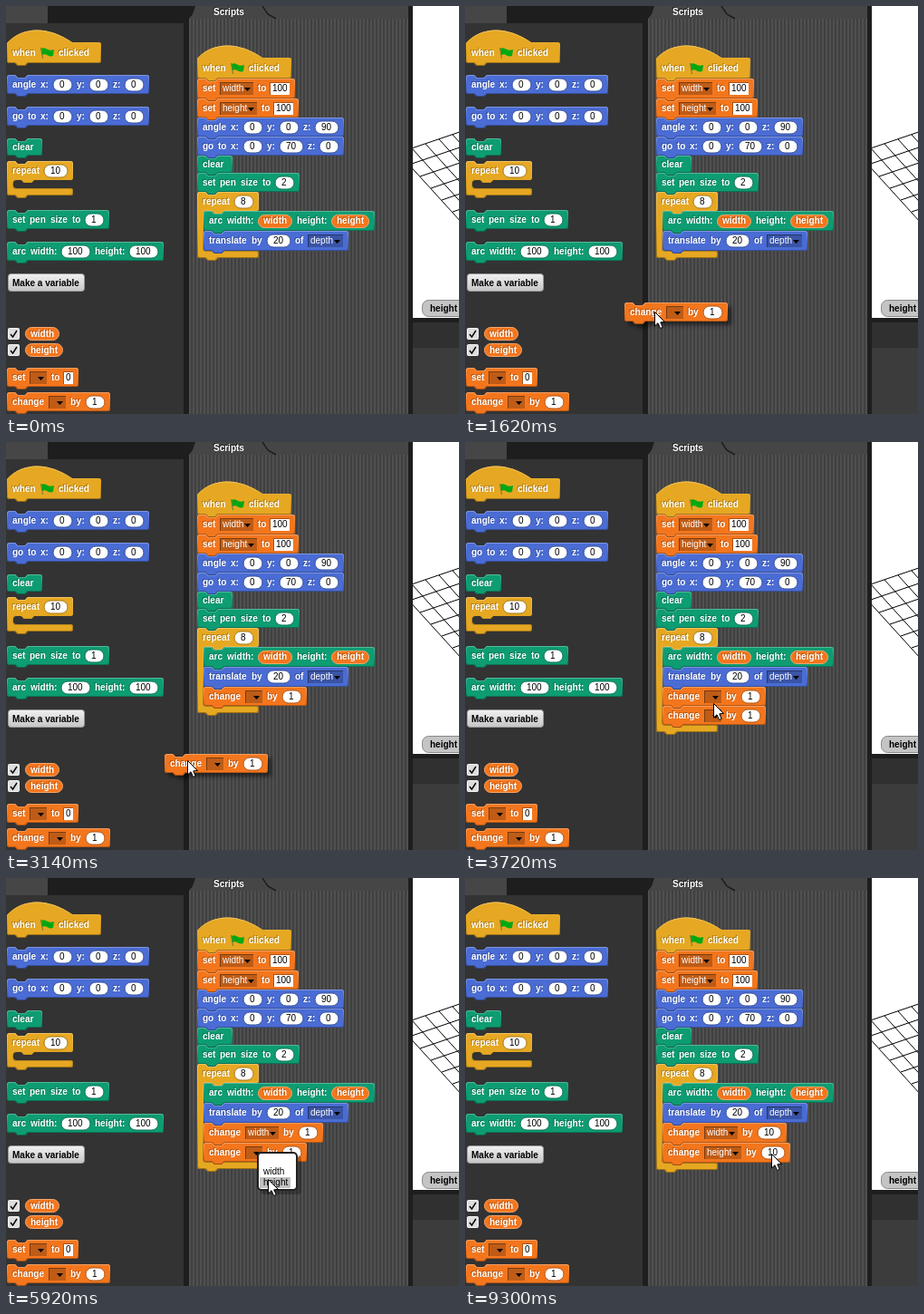
Recreate the animation shown at these times as an HTML page with a canvas. Size 500 by 450 pixels, loop 9540 ms.

```html
<!DOCTYPE html>
<html lang="en">
<head>
<meta charset="utf-8">
<title>Block script editor</title>
<style>
html, body { margin: 0; width: 100%; height: 100%; overflow: hidden; background: #1e1e1e; }
canvas { display: block; }
</style>
</head>
<body>
<canvas id="stage" width="500" height="450"></canvas>
<script>
const canvas = document.getElementById('stage');
let ctx = canvas.getContext('2d');

const LOOP = 9540, STEP = 40, GAP = 5;
const FONT = '10px "Liberation Sans", Arial, sans-serif';
const BOLD = 'bold ' + FONT;
const YELLOW = [230, 168, 34], BLUE = [74, 108, 212], GREEN = [14, 156, 114], ORANGE = [243, 118, 29];

const rgb = c => `rgb(${c.map(Math.round)})`;
const dark = (c, k) => rgb(c.map(v => v * k));
const light = (c, k) => rgb(c.map(v => v + (255 - v) * k));

function rect(x, y, w, h, fill) {
  ctx.fillStyle = fill;
  ctx.fillRect(x, y, w, h);
}

function round(x, y, w, h, r, fill, line) {
  ctx.beginPath();
  ctx.roundRect(x, y, w, h, r);
  ctx.fillStyle = fill;
  ctx.fill();
  if (line) {
    ctx.strokeStyle = line;
    ctx.lineWidth = 1;
    ctx.stroke();
  }
}

function poly(points, fill) {
  ctx.beginPath();
  points.forEach(([x, y]) => ctx.lineTo(x, y));
  ctx.closePath();
  ctx.fillStyle = fill;
  ctx.fill();
}

function line(points, color, width) {
  ctx.beginPath();
  points.forEach(([x, y]) => ctx.lineTo(x, y));
  ctx.strokeStyle = color;
  ctx.lineWidth = width;
  ctx.stroke();
}

function text(s, x, cy, fill, font = BOLD, shade) {
  const bx = Math.round(x), by = Math.round(cy + 3.4);
  ctx.font = font;
  if (shade) {
    ctx.fillStyle = shade;
    ctx.fillText(s, bx - 1, by - 1);
  }
  ctx.fillStyle = fill;
  ctx.fillText(s, bx, by);
}

function measure(s, font) {
  ctx.font = font;
  return ctx.measureText(s).width;
}

function flag(x, cy) {
  ctx.beginPath();
  ctx.moveTo(x + 1, cy - 5);
  ctx.bezierCurveTo(x + 6, cy - 8, x + 8, cy - 1, x + 15, cy - 4);
  ctx.lineTo(x + 14, cy + 3);
  ctx.bezierCurveTo(x + 8, cy + 5, x + 7, cy - 1, x + 2, cy + 2);
  ctx.closePath();
  ctx.fillStyle = '#00a814';
  ctx.fill();
  line([[x + .5, cy - 6], [x + 2.5, cy + 6]], '#6b7a2a', 1);
}

// Tokens: (n) oval input, [n] box input, <v> drop-down, {v} variable, @ flag, otherwise a word.
function tokenWidth(tok) {
  const s = tok.slice(1, -1);
  switch (tok[0]) {
    case '(': return Math.round(measure(s, FONT) + 15);
    case '[': return Math.round(measure(s, FONT) + 4);
    case '<': return s ? Math.round(measure(s, FONT) + 13.5) : 19;
    case '{': return Math.round(measure(s, BOLD) + 12);
    case '@': return 15;
  }
  return Math.round(measure(tok, BOLD));
}

function variable(s, x, cy, w) {
  round(x + .5, Math.floor(cy) - 6.5, w - 1, 14, 7, rgb(ORANGE), light(ORANGE, .35));
  text(s, x + 6, cy, '#fff', BOLD, dark(ORANGE, .75));
}

function drawToken(tok, x, cy, w, color) {
  const s = tok.slice(1, -1);
  switch (tok[0]) {
    case '(':
      round(x, cy - 7, w, 14, 7, '#fff', dark(color, .72));
      return text(s, x + 7, cy, '#000', FONT);
    case '[':
      rect(x - 1, cy - 7, w + 1, 14, dark(color, .7));
      rect(x, cy - 6, w, 13, '#fff');
      return text(s, x + 2, cy, '#000', FONT);
    case '<':
      rect(x, cy - 7, w, 14, dark(color, .78));
      rect(x, cy - 7, w, 1, dark(color, .5));
      rect(x, cy - 7, 1, 14, dark(color, .5));
      text(s, x + 3, cy, '#fff', FONT);
      return poly([[x + w - 10, cy - 1], [x + w - 3, cy - 1], [x + w - 6.5, cy + 3]], '#000');
    case '{': return variable(s, x, cy, w);
    case '@': return flag(x, cy);
  }
  text(tok, x, cy, '#fff', BOLD, dark(color, .72));
}

function nub(x, y) {
  [[23, 0], [20, 3], [12, 3], [9, 0]].forEach(([dx, dy]) => ctx.lineTo(x + dx, y + dy));
}

function outline(x, y, w, h, hat, slot) {
  const r = 3, right = x + w;
  let bottom = y + h;
  ctx.beginPath();
  if (hat) {
    ctx.moveTo(x, y + 1);
    ctx.bezierCurveTo(x + 18, y - 18, x + 45, y - 18, x + 72, y);
  } else {
    ctx.moveTo(x, y + r);
    ctx.arcTo(x, y, x + r, y, r);
    [[9, 0], [12, 3], [20, 3], [23, 0]].forEach(([dx, dy]) => ctx.lineTo(x + dx, y + dy));
  }
  ctx.arcTo(right, y, right, y + r, r);
  ctx.arcTo(right, bottom, right - r, bottom, r);
  if (slot) {
    nub(x + 7, bottom);
    ctx.arcTo(x + 7, bottom, x + 7, bottom + r, r);
    bottom += slot;
    ctx.arcTo(x + 7, bottom, x + 10, bottom, r);
    ctx.arcTo(right, bottom, right, bottom + r, r);
    bottom += 8;
    ctx.arcTo(right, bottom, right - r, bottom, r);
  }
  nub(x, bottom);
  ctx.arcTo(x, bottom, x, bottom - r, r);
  ctx.closePath();
  return bottom + 3;
}

function block(x, y, h, color, spec, { hat, slot, lifted, min = 39 } = {}) {
  const tokens = spec.split(' ');
  const widths = tokens.map(tokenWidth);
  const sum = widths.reduce((a, b) => a + b, 0);
  const w = Math.max(min, sum + GAP * (tokens.length - 1) + 12);
  ctx.save();
  const end = outline(x, y, w, h, hat, slot);
  ctx.fillStyle = rgb(color);
  if (lifted) {
    ctx.shadowColor = 'rgba(0,0,0,.5)';
    ctx.shadowBlur = 4;
    ctx.shadowOffsetX = ctx.shadowOffsetY = 4;
  }
  ctx.fill();
  ctx.shadowColor = 'transparent';
  ctx.clip();
  const rim = ctx.createLinearGradient(0, hat ? y - 14 : y, 0, end);
  rim.addColorStop(0, light(color, .3));
  rim.addColorStop(.45, rgb(color));
  rim.addColorStop(1, dark(color, .65));
  ctx.strokeStyle = rim;
  ctx.lineWidth = 2;
  ctx.stroke();
  ctx.restore();
  let tx = x + 6;
  tokens.forEach((tok, i) => {
    drawToken(tok, tx, Math.round(y + h / 2), widths[i], color);
    tx += widths[i] + GAP;
  });
}

function checkbox(y) {
  round(2.5, y + .5, 12, 12, 1, '#ddd', '#f4f4f4');
  line([[5, y + 7], [7.5, y + 10], [12, y + 3]], '#000', 1.4);
}

function drawPanels() {
  rect(0, 0, 500, 450, '#1e1e1e');
  rect(0, 0, 46, 19, '#464646');
  rect(0, 19, 196, 431, '#333');
  rect(202, 14, 242, 436, '#404040');
  for (let x = 202; x < 444; x += 4) rect(x, 14, 2, 436, '#505050');
  rect(283, 0, 161, 14, '#464646');
  poly([[202, 14], [206, 9], [209, 0], [283, 0], [289, 9], [298, 14]], '#464646');
  line([[283, 0], [289, 9], [298, 14]], '#1e1e1e', 1.5);
  text('Scripts', 229, 6.5, '#fff', BOLD, '#222');
  rect(449, 349, 51, 28, '#303030');
  rect(449, 377, 51, 73, '#3c3c3c');
}

function drawStage() {
  ctx.save();
  ctx.beginPath();
  ctx.rect(449, 0, 51, 344);
  ctx.clip();
  rect(449, 0, 51, 344, '#fff');
  for (let k = 0; k < 7; k++) {
    const ax = 433 + 12 * k, ay = 162 + 13 * k;
    const bx = 433 + 15 * k, by = 162 - 5 * k;
    line([[ax, ay], [ax + 100, ay - 34]], '#000', 1);
    line([[bx, by], [bx + 100, by + 110]], '#000', 1);
  }
  round(459.5, 324.5, 60, 18, 7, '#c4c4c4', '#888');
  text('height', 468, 333.5, '#000');
  ctx.restore();
}

function drawPalette() {
  block(1, 40, 23, YELLOW, 'when @ clicked', { hat: true, min: 104 });
  block(1, 76, 21, BLUE, 'angle x: (0) y: (0) z: (0)');
  block(1, 111, 21, BLUE, 'go to x: (0) y: (0) z: (0)');
  block(1, 146, 19, GREEN, 'clear');
  block(1, 171, 21, YELLOW, 'repeat (10)', { slot: 9 });
  block(1, 225, 21, GREEN, 'set pen size to (1)');
  block(1, 260, 21, GREEN, 'arc width: (100) height: (100)');
  const face = ctx.createLinearGradient(0, 296, 0, 315);
  face.addColorStop(0, '#f0f0f0');
  face.addColorStop(1, '#c4c4c4');
  round(2.5, 295.5, 84, 19, 3, face, '#999');
  text('Make a variable', 7, 305.5, '#000');
  checkbox(355);
  checkbox(373);
  variable('width', 21, 361.5, 38);
  variable('height', 21, 379.5, 42);
  block(1, 399, 21, ORANGE, 'set <> to [0]');
  block(1, 426, 21, ORANGE, 'change <> by (1)');
}

function drawScript() {
  block(211, 57, 23, YELLOW, 'when @ clicked', { hat: true, min: 104 });
  block(211, 80, 22, ORANGE, 'set <width> to [100]');
  block(211, 102, 21, ORANGE, 'set <height> to [100]');
  block(211, 123, 21, BLUE, 'angle x: (0) y: (0) z: (90)');
  block(211, 144, 21, BLUE, 'go to x: (0) y: (70) z: (0)');
  block(211, 165, 19, GREEN, 'clear');
  block(211, 184, 21, GREEN, 'set pen size to (2)');
}

function drawLoop(t) {
  const h1 = t < 5110 ? 21 : 22, h2 = t < 6220 ? 21 : 22;
  const one = t >= 2120, two = t >= 3640;
  const slot = 44 + (one ? h1 : 0) + (two ? h2 : 0);
  block(211, 205, 21, YELLOW, 'repeat (8)', { slot });
  block(218, 226, 22, GREEN, 'arc width: {width} height: {height}');
  block(218, 248, 22, BLUE, 'translate by (20) of <depth>');
  if (one) block(218, 270, h1, ORANGE, `change <${t < 5110 ? '' : 'width'}> by (${t < 7970 ? 1 : 10})`);
  if (two) block(218, 270 + h1, h2, ORANGE, `change <${t < 6220 ? '' : 'height'}> by (${t < 9090 ? 1 : 10})`);
}

// Pointer moves: start, end, from, bend, to.
const moves = [
  [460, 1060, [429, 367], [130, 415], [28, 438]],
  [1260, 1900, [34, 437], [170, 393], [261, 284]],
  [2170, 2650, [261, 284], [120, 375], [19, 438]],
  [2820, 3420, [26, 437], [171, 391], [255, 303]],
  [3600, 3760, [255, 303], [268, 292], [276, 287]],
  [3980, 3980, [275, 285], [275, 285], [275, 285]],
  [4150, 4150, [275, 281], [275, 281], [275, 281]],
  [4580, 4940, [275, 281], [284, 290], [291, 303]],
  [5180, 5460, [291, 303], [280, 304], [274, 300]],
  [5640, 6000, [274, 300], [282, 315], [290, 336]],
  [6240, 6760, [290, 336], [318, 310], [334, 281]],
  [8310, 8830, [334, 281], [337, 292], [338, 304]]
];

function pointer(t) {
  const move = moves.findLast(m => m[0] <= t);
  if (!move) return null;
  const [t0, t1, a, c, b] = move;
  const u = t1 > t0 ? Math.min(1, Math.floor((t - t0) / STEP) * STEP / (t1 - t0)) : 1;
  const s = 1 - (1 - u) ** 1.6, q = 1 - s;
  return a.map((v, i) => Math.round(q * q * v + 2 * s * q * c[i] + s * s * b[i]));
}

function drawDrag(t, [x, y]) {
  const first = t >= 1300 && t < 2120, second = t >= 2860 && t < 3640;
  if (first && t >= 1780) rect(218, 272, 161, 5, '#fff');
  if (second && t >= 3300) rect(218, 293, 115, 5, '#fff');
  if (first) block(x - 33, y - 10, 21, ORANGE, 'change <> by (1)', { lifted: true });
  if (second) block(x - 25, y - 7, 21, ORANGE, 'change <> by (1)', { lifted: true });
}

function drawMenu(x, y, py) {
  round(x + 4, y + 4, 45, 43, 4, 'rgba(0,0,0,.25)');
  round(x, y, 45, 43, 5, '#222');
  round(x + 2, y + 2, 41, 39, 3, '#fff');
  const row = Math.floor((py - y - 4) / 12);
  if (row >= 0 && row < 3) rect(x + 3, y + 4 + row * 12, 34, 12, '#c0c0c0');
  text('width', x + 7, y + 22, '#000', FONT);
  text('height', x + 7, y + 34, '#000', FONT);
}

function drawCaret(t) {
  if (t >= 6980 && t < 7450) rect(335, 274, 1, 13, '#000');
  if (t >= 7970 && t < 8430) rect(341, 274, 1, 13, '#000');
  if (t >= 9090 && t < 9300) rect(345, 296, 1, 12, '#000');
}

function drawPointer([x, y]) {
  ctx.beginPath();
  [[.5, .5], [.5, 16], [4, 12.7], [6.6, 18.5], [9.2, 17.4], [6.8, 11.8], [11.5, 11.5]]
    .forEach(([dx, dy]) => ctx.lineTo(x + dx, y + dy));
  ctx.closePath();
  ctx.fillStyle = '#fff';
  ctx.fill();
  ctx.strokeStyle = '#000';
  ctx.lineWidth = 1;
  ctx.stroke();
}

// Everything that never changes is painted once.
const backdrop = document.createElement('canvas');
backdrop.width = 500;
backdrop.height = 450;
const view = ctx;
ctx = backdrop.getContext('2d');
drawPanels();
drawStage();
drawPalette();
drawScript();
ctx = view;

function render(t) {
  ctx.drawImage(backdrop, 0, 0);
  drawLoop(t);
  drawCaret(t);
  const p = pointer(t);
  if (!p) return;
  drawDrag(t, p);
  if (t >= 4410 && t < 5110) drawMenu(277, 283, p[1]);
  if (t >= 5640 && t < 6220) drawMenu(277, 302, p[1]);
  drawPointer(p);
}

const start = performance.now();
function tick() {
  render((performance.now() - start) % LOOP);
  requestAnimationFrame(tick);
}
tick();
</script>
</body>
</html>
```
